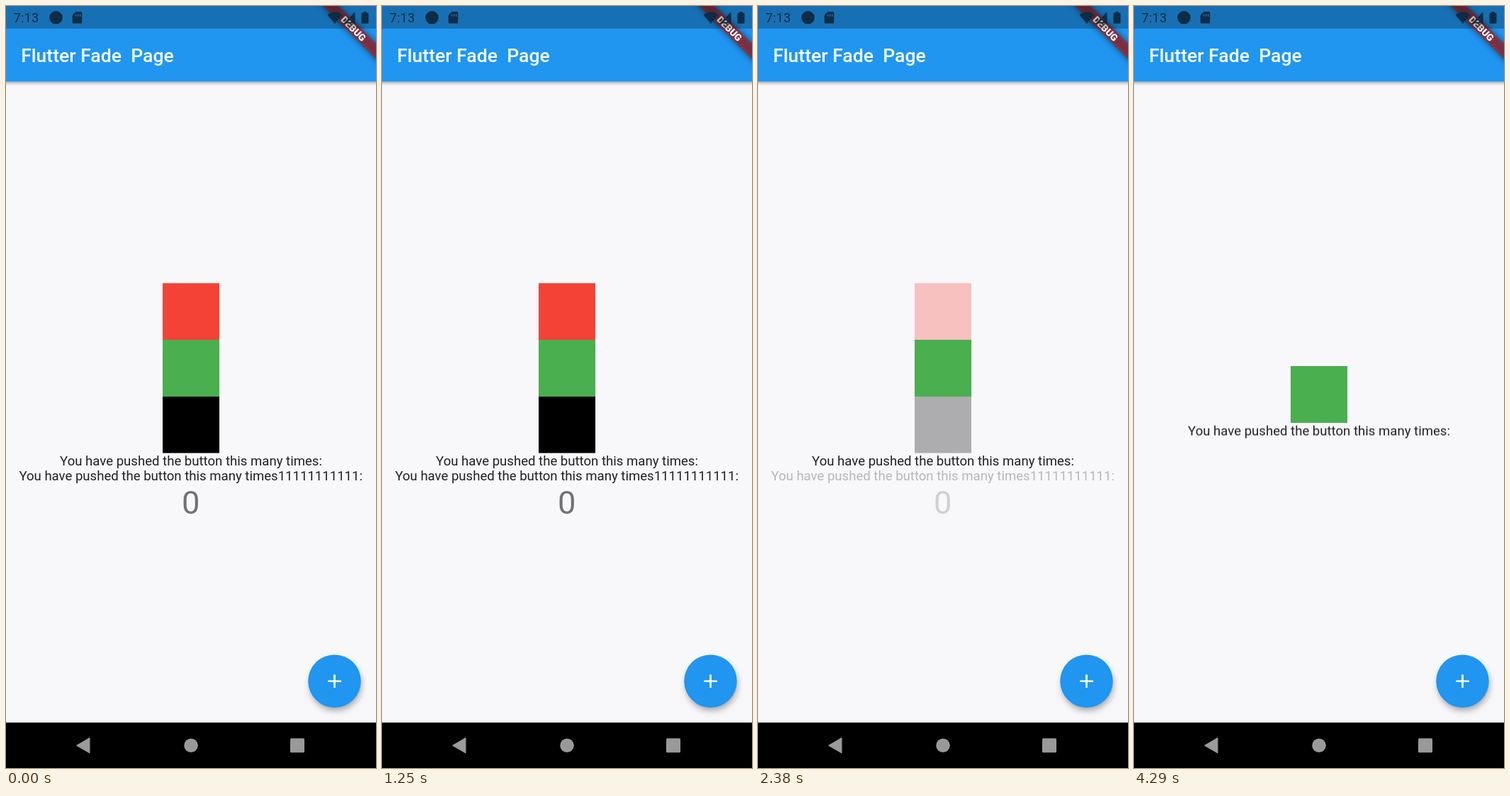
These frames come from a looping animation (522 by 1073 pixels, 4330 ms). An HTML page:

```html
<!DOCTYPE html>
<html lang="en">
<head>
<meta charset="utf-8">
<title>Fade page</title>
<style>
  html, body { margin: 0; width: 100%; height: 100%; overflow: hidden; background: #f8f8fb; }
  svg { display: block; width: 100%; height: 100%; font-family: Roboto, sans-serif; }
  .center { text-anchor: middle; }
  .body { font-size: 18.59px; fill: #000; fill-opacity: .87; }
  .fade, .square, .label { animation: 4330ms linear infinite; }
  .fade { animation-name: fade; }
  .square { --shift: 37px; animation-name: relayout; }
  .label { --shift: -42.4px; animation-name: relayout; }
  @keyframes fade {
    0%, 32.33% { opacity: 1; }
    64.66%, 100% { opacity: 0; }
  }
  /* The remaining items close up as soon as the fade has finished. */
  @keyframes relayout {
    0%, 64.66% { transform: translateY(0); }
    64.67%, 100% { transform: translateY(var(--shift)); }
  }
</style>
</head>
<body>
<svg viewBox="0 0 522 1073" preserveAspectRatio="none">
  <defs>
    <filter id="soft" x="-50%" y="-50%" width="200%" height="200%">
      <feGaussianBlur stdDeviation="5"/>
    </filter>
    <filter id="thin" x="-20" y="90" width="562" height="40" filterUnits="userSpaceOnUse">
      <feGaussianBlur stdDeviation="2"/>
    </filter>
  </defs>

  <rect width="522" height="1073" fill="#f8f8fb"/>

  <!-- App bar -->
  <rect x="-10" y="96" width="542" height="12.5" fill-opacity=".34" filter="url(#thin)"/>
  <rect width="522" height="106.3" fill="#2096f1"/>
  <text x="21.2" y="79.3" font-size="26.56" font-weight="500" fill="#fff" xml:space="preserve">Flutter Fade  Page</text>

  <!-- Column -->
  <g class="fade">
    <rect x="221" y="390.3" width="80" height="79.7" fill="#f44336"/>
    <rect x="221" y="550" width="80" height="79.5"/>
    <text class="body center" x="260.7" y="668">You have pushed the button this many times11111111111:</text>
    <text class="center" x="260.7" y="715" font-size="45.2" fill-opacity=".54">0</text>
  </g>
  <rect class="square" x="221" y="470" width="80" height="80" fill="#4aaf4f"/>
  <text class="body center label" x="261" y="646.7">You have pushed the button this many times:</text>

  <!-- Floating button -->
  <circle cx="465" cy="956" r="36" fill-opacity=".36" filter="url(#soft)"/>
  <circle cx="463.5" cy="950.7" r="37.3" fill="#2096f1"/>
  <path d="M454.2 950.7h18.6M463.5 941.4v18.6" stroke="#fff" stroke-width="2.6"/>

  <!-- Corner banner -->
  <g transform="translate(522 0) rotate(45)">
    <rect x="-60" y="37.2" width="120" height="15.9" fill-opacity=".5" filter="url(#soft)"/>
    <rect x="-60" y="37.2" width="120" height="15.9" fill="#b71c1c" fill-opacity=".63"/>
    <text class="center" x="0" y="49.9" font-size="13.55" font-weight="900" fill="#fff">DEBUG</text>
  </g>

  <!-- Status bar -->
  <rect width="522" height="31.9" fill-opacity=".25"/>
  <g fill="#0d2c47">
    <text x="10.5" y="23" font-size="18.6">7:13</text>
    <circle cx="70.5" cy="16.3" r="9.3"/>
    <path fill-rule="evenodd" d="M98.5 8H106q1.3 0 1.3 1.3V23q0 1.5-1.5 1.5H95.200q-1.500 0-1.500-1.500V13zM98 11.500v3.300h1.500v-3.300zM101 11.500v3.300h1.500v-3.300zM104 11.500v3.300h1.500v-3.300z"/>
    <path d="M453.500 12.500Q464 4.500 474.500 12.500L464 25z"/>
    <path fill-rule="evenodd" d="M492.500 8.300V24.500H476.500zM490.500 13L481.500 22.500H487V17z"/>
    <path d="M501.500 11q0-1.200 1.200-1.200H504.500V8h4v1.800h1.800q1.200 0 1.200 1.200V23.500q0 1.200-1.200 1.200h-7.600q-1.200 0-1.200-1.200z"/>
  </g>

  <!-- Navigation bar -->
  <rect y="1009" width="522" height="64"/>
  <g fill="#999">
    <path d="M99.500 1041.300L118 1030.500V1052z" stroke="#999" stroke-linejoin="round"/>
    <circle cx="261" cy="1041.300" r="9.800"/>
    <rect x="401" y="1031.300" width="20" height="20" rx="1.500"/>
  </g>
</svg>
</body>
</html>
```
